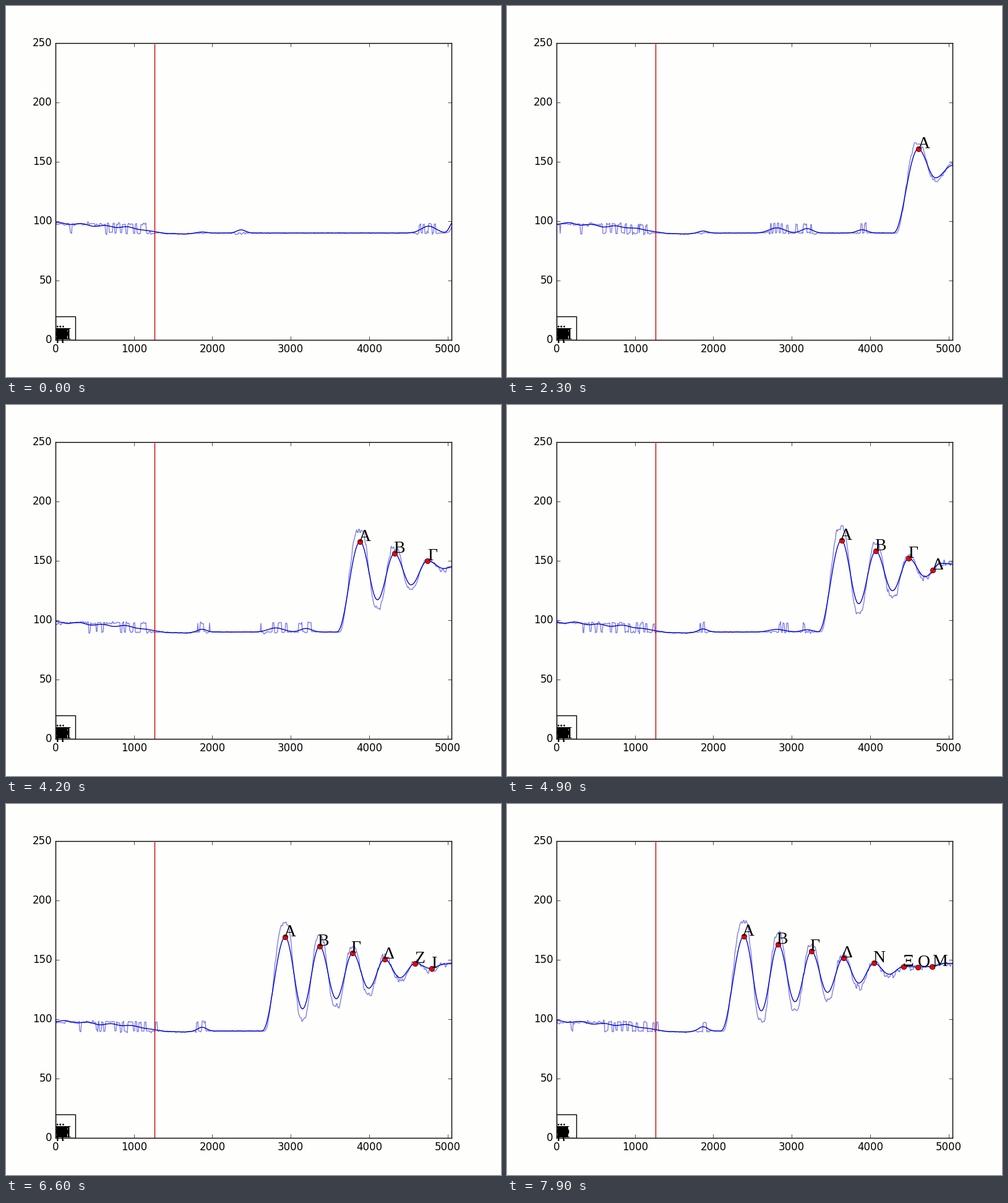
Recreate the animation shown at these times as a matplotlib script. Size 800 by 600 pixels, loop 8 s.

```python
import numpy as np
import matplotlib.pyplot as plt
from matplotlib.animation import FuncAnimation
from matplotlib.patches import Rectangle

FRAMES, INTERVAL = 80, 100
SPAN, LEVEL, FLOOR = 5050, 147, 90
LEFT, RIGHT = 80, 720
PAPER = "#fefefc"

plt.rcParams.update({"font.family": "DejaVu Sans", "font.size": 12})

# Curves are laid out over pixel columns.
px = np.arange(LEFT, RIGHT + 1)
MARKED = [0, 2, 4, 6, 8, 10, 11, 12]
LETTERS = [chr(c) for c in range(913, 940) if c != 930] + ["μ", "η"]


def to_x(p):
    return (np.asarray(p) - LEFT) / (RIGHT - LEFT) * SPAN


def blur(y, n):
    return np.convolve(np.pad(y, n // 2, mode="edge"), np.ones(n) / n, "valid")


def bump(centre, width, height):
    return height * np.exp(-((px - centre) / width) ** 2)


def offset(k):
    """Distance of the k-th extreme behind the first crest."""
    return 28.2 * k - .24 * k ** 2


def front_at(n):
    return np.interp(n, [0, 23, 35, 49, 79], [758, 664.5, 604, 540.5, 383])


def extremes(front):
    """Crests (even) and troughs (odd) grow as they travel from the right edge."""
    k = np.arange(15)
    x = front + offset(k)
    age = np.maximum(RIGHT - x, 0)
    crest = (24.5 - 3 * k) * (1 - np.exp(-(age + 55 * (k == 0)) / 130))
    trough = -(45.5 - 3.5 * k) * (1 - np.exp(-age / 95))
    amp = np.where(k % 2, trough, crest)
    boost = np.where(amp > 0, 1 + .5 * np.minimum(age / 100, 1), 1.22)
    return x, amp, boost


def swing(xs, hs, base, sharp=1.0):
    """Half-cosine arcs between successive extremes, rising out of base."""
    i = np.clip(np.searchsorted(xs, px) - 1, 0, len(xs) - 2)
    u = np.clip((px - xs[i]) / (xs[i + 1] - xs[i]), 0, 1)
    u = np.clip((u - .5) * sharp + .5, 0, 1)
    u = (1 - np.cos(np.pi * u)) / 2
    start = np.where(i == 0, base, hs[i])
    return start + (hs[i + 1] - start) * u


def quiet(n):
    """Resting profile ahead of the wave."""
    y = np.interp(px, [80, 105, 155, 195, 258, 290, 310],
                  [98.2, 98, 95.8, 95, 89.6, 89.2, FLOOR])
    y += .8 * np.sin(px / 6 + n / 6) * np.clip((240 - px) / 60, 0, 1)
    y += bump(317, 9, 1 + n / 26)
    early = max(1 - n / 12, 0)
    y += bump(380, 9, 3 * early) + bump(683, 16, 6 * early)
    later = min(n / 12, 1) * np.clip((62 - n) / 25, 0, 1)
    y += later * (bump(436, 17, 4.5) + bump(485, 12, 4) + bump(574, 11, 3))
    return blur(y, 9)


def flicker(base, n):
    """Jumps between the two resting levels, as often as base asks for."""
    cells = np.random.default_rng(3).random(214)
    cells = (cells + .5 * np.random.default_rng(n // 6 + 50).random(214)) % 1
    field = np.repeat(cells, 3)[:px.size]
    share = (base - FLOOR) / 8
    return np.where(share > .06, np.where(field < share, 97.5, FLOOR), base)


def curves(n):
    front = front_at(n)
    x, amp, boost = extremes(front)
    xs = np.append(front - np.interp(n, [15, 25], [50, 37]), x)
    base = quiet(n)
    smooth = blur(swing(xs, np.append(FLOOR, LEVEL + amp), base), 5)
    raw = swing(xs, np.append(FLOOR, LEVEL + amp * boost), flicker(base, n), 1.25)

    noise = np.repeat(np.random.default_rng(n + 200).normal(size=321), 2)[:px.size]
    busy = np.where(np.abs(base - FLOOR) > 1, .6, .2)
    return front, smooth, raw + noise * np.where(px > xs[0] + 12, 1.2, busy)


fig = plt.figure(figsize=(8, 6), dpi=100, facecolor=PAPER)
ax = fig.add_axes([.1, .1, .8, .8], facecolor=PAPER)
ax.set(xlim=(0, SPAN), ylim=(0, 250),
       xticks=range(0, 5001, 1000), yticks=range(0, 251, 50))
ax.tick_params(direction="in", length=4, width=.5, pad=4, top=True, right=True)
plt.setp(ax.get_yticklabels(), va="center")
plt.setp(ax.spines.values(), linewidth=1)

raw_line, = ax.plot([], [], color="#0000d0", alpha=.5, lw=1)
smooth_line, = ax.plot([], [], color="#0000d0", lw=1)
ax.plot([SPAN / 4] * 2, [0, 249], color="#c80000", lw=1)
ax.add_patch(Rectangle((0, 0), SPAN * .05, 20, fill=False, lw=1))
dots, = ax.plot([], [], "o", ms=6, mfc="#f00000", mec="black", mew=.5)
labels = {c: ax.text(0, 0, c, family="Liberation Serif", size=20, zorder=5)
          for c in LETTERS}


def draw(n):
    front, smooth, raw = curves(n)
    raw_line.set_data(to_x(px), raw)
    smooth_line.set_data(to_x(px), smooth)

    # Letters not in use wait in a pile at the axes corner.
    for text in labels.values():
        text.set_position((0, .4))

    names = "ΑΒΓΔΖΙΟΜ" if n < 71 else "ΑΒΓΔΝΞΟΜ"
    spots = []
    for k, name in zip(MARKED, names):
        x = front + offset(k)
        edge = 688 if k else 717
        if x > edge + 24 or (k == 0 and x > 722):
            continue
        x = min(x, edge)
        y = np.interp(x, px, smooth)
        spots.append((to_x(x), y))
        shift = np.interp(x, [560, 690], [-3, 0])
        labels[name].set_position((to_x(x + shift), y + .5))
    dots.set_data([s[0] for s in spots], [s[1] for s in spots])
    return [raw_line, smooth_line, dots, *labels.values()]


anim = FuncAnimation(fig, draw, frames=FRAMES, interval=INTERVAL,
                     repeat=True, repeat_delay=0)
plt.show()
```
